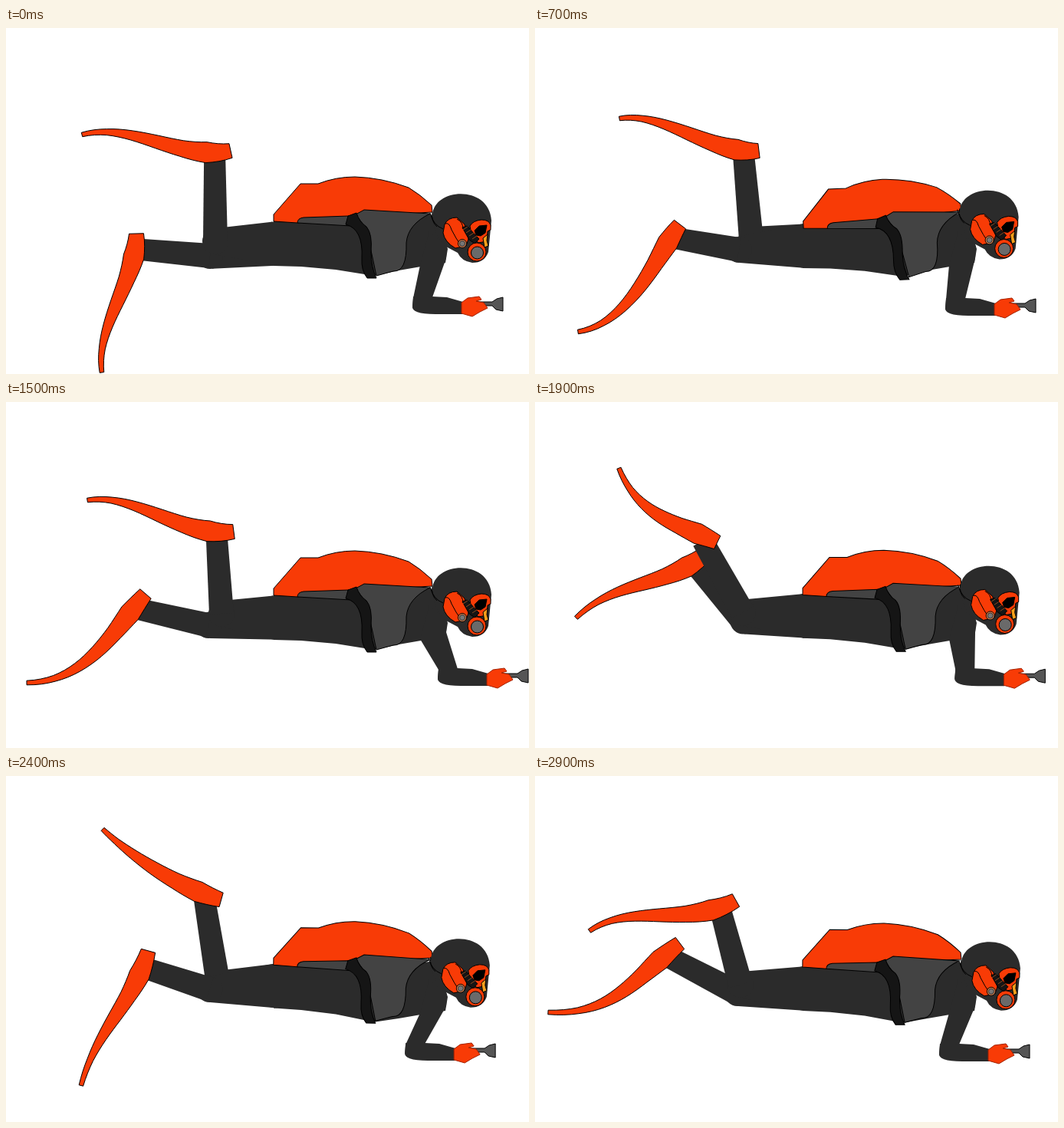
These frames come from a looping animation (682 by 451 pixels, 3000 ms). An HTML page with a canvas:

```html
<!DOCTYPE html>
<html>
<head>
<meta charset="utf-8">
<title>Diver</title>
<style>
html, body { margin: 0; width: 100%; height: 100%; overflow: hidden; background: #fff; }
canvas { display: block; }
</style>
</head>
<body>
<canvas id="stage" width="682" height="451"></canvas>
<script>
const ctx = document.getElementById('stage').getContext('2d');
const LOOP = 3000, STEP = 100;
const ORANGE = '#f83b06', SUIT = '#2b2b2b', VEST = '#434343', BLACK = '#151515';

// Leg poses: time, knee, then four points along the fin from heel to tip
const legA = [
  [0, 273,278, 293,160, 229,157, 164,140, 99,139],
  [300, 275,278, 252,182, 194,152, 138,121, 100,81],
  [500, 266,285, 192,226, 141,262, 88,293, 17,300],
  [700, 266,289, 189,256, 156,308, 114,364, 56,396],
  [800, 265,295, 178,258, 157,318, 125,372, 95,415],
  [1100, 276,292, 220,213, 161,240, 99,254, 41,280],
  [1500, 281,276, 297,169, 232,160, 169,136, 106,128],
  [1800, 274,272, 260,170, 209,127, 165,79, 142,15],
  [2100, 264,282, 190,220, 140,263, 88,298, 18,309],
  [2200, 262,281, 192,237, 150,285, 100,326, 32,347],
  [2300, 262,281, 177,245, 156,306, 128,364, 100,427],
  [2600, 272,272, 213,188, 166,236, 112,271, 71,317],
  [2900, 268,272, 262,162, 196,180, 130,183, 71,202]
];
const legB = [
  [0, 266,297, 170,268, 157,328, 133,388, 125,449],
  [350, 270,289, 216,204, 163,240, 108,264, 58,300],
  [700, 282,276, 292,160, 232,150, 170,126, 110,118],
  [1000, 276,277, 262,176, 210,134, 163,88, 138,30],
  [1100, 276,280, 245,188, 189,154, 134,112, 103,54],
  [1400, 266,289, 186,228, 138,277, 85,318, 8,325],
  [1500, 264,291, 182,250, 141,301, 93,346, 27,366],
  [1600, 264,292, 172,258, 150,318, 115,370, 75,398],
  [1850, 270,287, 215,204, 163,240, 106,264, 52,300],
  [2200, 279,275, 280,158, 214,167, 149,161, 84,172],
  [2600, 272,270, 262,177, 211,134, 167,87, 146,23],
  [2900, 264,283, 189,218, 139,261, 88,296, 17,308]
];
// time, lift, tilt, hip height
const torsoKeys = [
  [0, 0, 0, 281], [700, -2, -.053, 284], [1100, -3, -.062, 287], [1500, 0, 0, 281],
  [2200, -2, -.005, 277], [2600, -3, .034, 271], [2900, -1, .01, 277]
];
// time, forearm offset
const armKeys = [
  [0, 0, 0], [700, 5, 2], [1100, 17, 0], [1200, 22, -1], [1500, 33, -3],
  [1800, 25, -3], [2200, -8, -2], [2600, -7, -2], [2900, -3, -1]
];

// Smooth periodic interpolation through unevenly spaced keys
function sample(keys, t) {
  const n = keys.length;
  const key = i => {
    const k = keys[(i + n) % n];
    return [k[0] + Math.floor(i / n) * LOOP, ...k.slice(1)];
  };
  let i = n - 1;
  while (keys[i][0] > t) i--;
  const [a, b, c, d] = [key(i - 1), key(i), key(i + 1), key(i + 2)];
  const span = c[0] - b[0], u = (t - b[0]) / span, v = 1 - u;
  return b.slice(1).map((p, j) => {
    const q = c[j + 1];
    const m0 = (q - a[j + 1]) / (c[0] - a[0]) * span;
    const m1 = (d[j + 1] - p) / (d[0] - b[0]) * span;
    return (1 + 2 * u) * v * v * p + u * v * v * m0 + u * u * (3 - 2 * u) * q - u * u * v * m1;
  });
}

function shape(d, fill, line = '#000', width = 1) {
  const path = new Path2D(d);
  if (fill) { ctx.fillStyle = fill; ctx.fill(path); }
  if (line) { ctx.strokeStyle = line; ctx.lineWidth = width; ctx.stroke(path); }
}

function disc(x, y, r, fill, line) {
  shape(`M${x - r},${y}a${r},${r} 0 1 0 ${2 * r},0a${r},${r} 0 1 0 ${-2 * r},0z`, fill, line);
}

const polygon = points => 'M' + points.map(p => p.join()).join('L') + 'z';

function limb([x0, y0], r0, [x1, y1], r1) {
  const len = Math.hypot(x1 - x0, y1 - y0), nx = (y1 - y0) / len, ny = (x0 - x1) / len;
  shape(polygon([
    [x0 + nx * r0, y0 + ny * r0], [x1 + nx * r1, y1 + ny * r1],
    [x1 - nx * r1, y1 - ny * r1], [x0 - nx * r0, y0 - ny * r0]
  ]), SUIT, null);
}

// Point on the fin's centre line, shifted sideways towards the shin
function finPoint(p, u, side) {
  const at = w => {
    const a = w * 3, b = a - 1, c = a - 2, d = a - 3;
    const k = [-b * c * d / 6, a * c * d / 2, -a * b * d / 2, a * b * c / 6];
    return [0, 1].map(j => k.reduce((s, f, i) => s + f * p[2 * i + j], 0));
  };
  const [x, y] = at(u), [x0, y0] = at(u - .01), [x1, y1] = at(u + .01);
  const len = Math.hypot(x1 - x0, y1 - y0);
  return [x + (y1 - y0) / len * side, y - (x1 - x0) / len * side];
}

function finWidth(u) {
  const w = [9.5, 13.5, 10.5, 8.5, 6.2, 4, 2.8], i = Math.min(5, Math.floor(u * 6));
  return w[i] + (w[i + 1] - w[i]) * (u * 6 - i);
}

function drawLeg(keys, t, hipY) {
  const pose = sample(keys, t), knee = pose.slice(0, 2), fin = pose.slice(2);
  limb([352, hipY], 29, knee, 17);
  disc(...knee, 17, SUIT, null);
  limb(knee, 16, finPoint(fin, .11, 6), 14);
  const inner = [], outer = [];
  for (let i = 0; i <= 24; i++) {
    const u = i / 24, w = finWidth(u);
    inner.push(finPoint(fin, u, w));
    outer.unshift(finPoint(fin, u, -w));
  }
  shape(polygon([...inner, ...outer]), ORANGE);
}

function drawBody(hipY) {
  const sag = hipY - 281;
  shape(polygon([
    [349, hipY - 29], [470, 250], [553, 242], [566, 256], [576, 288], [573, 306], [541, 311],
    [512, 316], [480, 323 + sag * .3], [430, 315 + sag * .6], [385, 311 + sag * .8], [349, hipY + 29]
  ]), SUIT, null);
}

function drawGear(lift, tilt) {
  ctx.save();
  ctx.translate(555, 236 + lift);
  ctx.rotate(tilt);
  ctx.translate(-555, -236);
  shape('M349,252V243L384,203H407Q430,194 455,194Q490,195 525,208Q540,217 555,231L556,240L465,245L380,254z', ORANGE);
  shape('M380,254Q380,248 388,247L447,245L450,258z', VEST);
  shape('M456,243L467,237L553,242Q524,256 522,280Q523,318 505,317L483,323L470,262z', VEST);
  shape('M446,245L457,241Q461,253 470,259Q478,268 476,292Q476,312 483,326H471Q463,316 464,300Q466,262 443,256z', BLACK);
  ctx.restore();
}

function drawArm([dx, dy]) {
  shape(polygon([
    [540, 309], [552, 265], [575, 284], [574, 300],
    [556 + dx, 351 + dy], [552 + dx, 371 + dy], [530 + dx, 364 + dy], [531 + dx, 352 + dy]
  ]), SUIT, null);
  ctx.save();
  ctx.translate(dx, dy);
  shape('M531,350L556,350L575,351L596,357L595,373L560,373Q528,373 530,362z', SUIT, null);
  shape('M612,357H634L640,353L648,351V369L639,367L634,362H622z', '#555');
  shape('M594,358L602,352L617,350L620,354L613,356L623,358L628,365L618,370L608,376L594,372z', ORANGE, '#a32000');
  ctx.restore();
}

function drawHead(dx, dy) {
  ctx.save();
  ctx.translate(dx, dy);
  shape('M556,244C558,208 630,204 633,251L629,292Q624,306 608,306Q594,304 589,293L572,284Q556,266 556,244z', SUIT, null);
  shape('M553,241Q557,257 570,262M556,240Q554,252 562,259', null);
  // ear cover and strap
  shape('M572,256Q576,247 588,247L598,256L603,275L600,284L586,287Q572,279 570,267z', ORANGE);
  shape('M573,255Q578,253 581,263L587,274L591,280M588,249Q596,253 596,262', null);
  // visor
  shape('M605,258Q609,251 620,250Q630,250 632,257V263L628,265L627,278L616,280L607,269z', ORANGE);
  shape('M611,264L617,258L627,257L625,267L619,271L613,270z', '#000');
  shape('M622,274L628,269L627,277L629,284L624,286z', '#f9a01b');
  // hose
  shape('M595,260L601,258L617,275L611,281L604,276z', BLACK);
  shape('M596,263l6,-4M600,267l6,-4M604,271l6,-4M608,275l6,-4', null, '#8a4a20');
  disc(595, 281, 5.5, '#d98250');
  disc(595, 281, 3.5, '#777', '#333');
  // regulator
  disc(614, 292, 12, ORANGE);
  disc(614.5, 293, 8, '#6a6a6a');
  ctx.restore();
}

function draw(t) {
  ctx.fillStyle = '#fff';
  ctx.fillRect(0, 0, 682, 451);
  const [lift, tilt, hipY] = sample(torsoKeys, t);
  const bob = 1 - Math.cos(t / 1500 * 2 * Math.PI);
  drawLeg(legB, t, hipY);
  drawLeg(legA, t, hipY);
  drawBody(hipY);
  drawArm(sample(armKeys, t));
  drawGear(lift, tilt);
  drawHead(-1.2 * bob, -2.3 * bob);
}

const start = performance.now();
function frame() {
  const t = Math.max(0, performance.now() - start);
  draw(Math.floor(t / STEP) * STEP % LOOP);
  requestAnimationFrame(frame);
}
frame();
</script>
</body>
</html>
```
